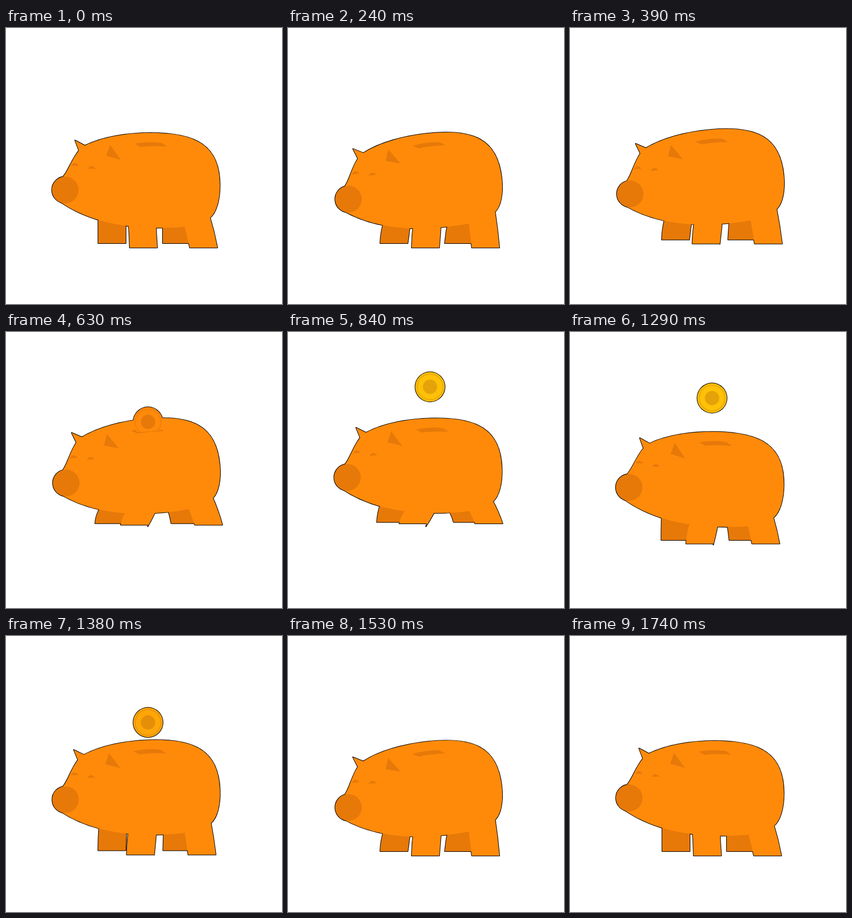
An HTML page with a canvas for the animation above (2.73 s loop, 500x500 px).

```html
<!DOCTYPE html>
<html lang="en">
<head>
<meta charset="utf-8">
<title>Piggy bank</title>
<style>
html, body { margin: 0; height: 100%; overflow: hidden; background: #fff; }
canvas { display: block; width: 500px; height: 500px; }
</style>
</head>
<body>
<canvas id="stage" width="500" height="500"></canvas>
<script>
const ctx = document.getElementById('stage').getContext('2d');
const LOOP = 2730, STEP = 30, LEG_WIDTH = 50;
const ORANGE = '#ff8a0a', DARK = '#e67908';

// spread: how far the foot moves aside in the air; swing: its later drift
const far = { ground: 390, rise: 45.5, toe: 0 };
const near = { ground: 398, rise: 51, toe: 0 };
const legs = {
  farFront: { ...far, hipX: 167, hipY: 340, footX: 167, spread: -6, swing: 0, bend: 0.9 },
  farHind: { ...far, hipX: 284, hipY: 348, footX: 284, spread: 16, swing: 0, bend: 0.7 },
  nearFront: { ...near, hipX: 221, hipY: 345, footX: 224, spread: -17, swing: -9, bend: 0.9, toe: 1 },
  nearHind: { ...near, hipX: 319, hipY: 341, footX: 333, spread: 9.5, swing: -6, bend: 0.5 }
};

const body = new Path2D(`M104 268.5 C113 258 119 238 132 222 L125 203.5 L143 213
  C175 197 220 190 262 190 C345 190 387.5 213 387.5 285 C387.5 312 381 335 369.5 344
  C345 361 310 362 275 362 C200 362 140 345 96 313.5 Z`);
const snout = new Path2D();
snout.arc(107.3, 293.3, 24.2, 0, 7);
const marks = new Path2D(`M188.5 211.5 L181.5 231.5 L208 239 Z
  M118 249.5 Q125 240 132 249.5 Z
  M148 255 Q155 245.5 162 255 Z
  M233 209.5 Q260 204.5 283 208.5 L292 215 Q265 213 244 215.5 Z`);
const aboveSlot = new Path2D('M0 -200 H500 V213 H0 Z');

const mix = (a, b, u) => a + (b - a) * u;
const clamp = u => Math.min(1, Math.max(0, u));

function ramp(t, from, to) {
  const u = clamp((t - from) / (to - from));
  return u * u * (3 - 2 * u);
}

// Eases up from a to b, holds, eases down from c to d
const pulse = (t, a, b, c, d) => ramp(t, a, b) - ramp(t, c, d);

function legPath(leg, pose, air, swing) {
  const a = pose.transformPoint({ x: leg.hipX, y: leg.hipY });
  const b = pose.transformPoint({ x: leg.hipX + LEG_WIDTH, y: leg.hipY });
  const left = leg.footX + leg.spread * air + leg.swing * swing;
  const right = left + LEG_WIDTH;
  const y = leg.ground - leg.rise * air;
  const drop = leg.toe * air * (3 + 4 * swing);
  const p = new Path2D();
  p.moveTo(a.x, a.y);
  p.quadraticCurveTo(mix(a.x, left, leg.bend), (a.y + y) / 2, left, y);
  p.lineTo(right, y);
  p.lineTo(right - drop / 3, y + drop);
  p.quadraticCurveTo(mix(b.x, right, leg.toe ? 0.35 : 0.62), (b.y + y) / 2, b.x, b.y);
  p.closePath();
  return p;
}

function posed(path, pose) {
  const p = new Path2D();
  p.addPath(path, pose);
  return p;
}

function blend(from, to, u) {
  return `rgb(${from.map((c, i) => Math.round(mix(c, to[i], u)))})`;
}

function disc(y, r, color) {
  ctx.beginPath();
  ctx.arc(257.3, y, r, 0, 7);
  ctx.fillStyle = color;
  ctx.fill();
}

function draw(t) {
  const air = pulse(t, 300, 680, 1050, 1420);
  const nod = pulse(t, 0, 200, 1540, 1740);
  const swing = pulse(t, 630, 1000, 1290, 1480);
  const squash = pulse(t, 0, 200, 200, 390) + pulse(t, 1400, 1530, 1540, 1740);

  const tilt = 5 * nod + 1.2 * squash - 6 * swing;
  const pose = new DOMMatrix().translate(245, 280 + 2.5 * squash - 33.3 * air)
    .rotate(-tilt).translate(-245, -280);
  const leg = name => legPath(legs[name], pose, air, swing);
  const parts = [
    [leg('farFront'), DARK], [leg('farHind'), DARK],
    [posed(body, pose), ORANGE],
    [leg('nearFront'), ORANGE], [leg('nearHind'), ORANGE],
    [posed(snout, pose), DARK], [posed(marks, pose), DARK]
  ];

  // The coin is thrown up out of the slot and drops back in
  const coinY = 78.2 + (t - 1050) ** 2 * (t < 1050 ? 0.00048 : 0.00072);
  const coinShown = t >= 500 && t < 1530;
  const gold = pulse(t, 640, 840, 1330, 1430);
  const clipCoin = paint => {
    if (!coinShown) return;
    ctx.save();
    ctx.clip(posed(aboveSlot, pose));
    paint();
    ctx.restore();
  };

  ctx.fillStyle = '#fff';
  ctx.fillRect(0, 0, 500, 500);

  // Thin outline behind the joined silhouette
  ctx.strokeStyle = '#000';
  ctx.lineWidth = 2;
  ctx.lineJoin = 'round';
  for (const [path] of parts) ctx.stroke(path);
  clipCoin(() => disc(coinY, 27.8, '#000'));

  for (const [path, color] of parts) {
    ctx.fillStyle = color;
    ctx.fill(path);
  }

  clipCoin(() => {
    const face = blend([255, 138, 10], [255, 193, 7], gold);
    disc(coinY, 26.8, face);
    disc(coinY, 24.4, blend([240, 128, 9], [236, 170, 8], gold));
    disc(coinY, 22.4, face);
    disc(coinY, 13, blend([230, 121, 8], [228, 163, 8], gold));
  });
}

let start;
function frame(now) {
  start ??= now;
  const t = (now - start) % LOOP;
  draw(Math.floor(t / STEP) * STEP);
  requestAnimationFrame(frame);
}
draw(0);
requestAnimationFrame(frame);
</script>
</body>
</html>
```
